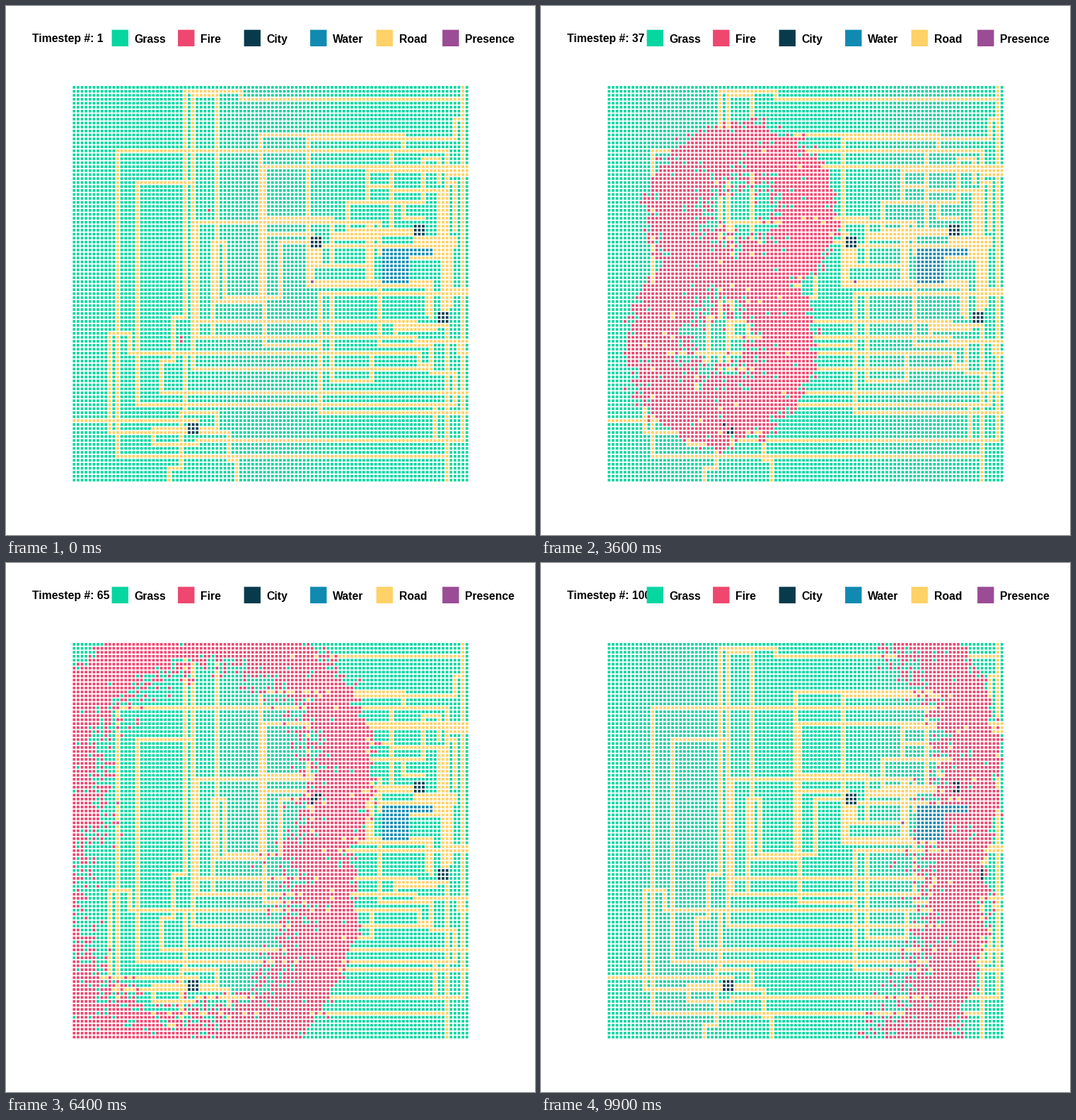
These frames come from a looping animation (748 px wide and 748 px high, 10 s). A matplotlib script:

```python
import numpy as np
import matplotlib.pyplot as plt
from matplotlib.animation import FuncAnimation
from matplotlib.patches import Rectangle

SIZE, N, STEPS = 748, 100, 100
SCALE = SIZE / 800          # layout is designed on an 800 px square
PITCH, CELL = 6, 4
LEGEND = [("Grass", "#06d6a0"), ("Fire", "#ef476f"), ("City", "#073b4c"),
          ("Water", "#118ab2"), ("Road", "#ffd166"), ("Presence", "#9a4c95")]
GRASS, FIRE, CITY, WATER, ROAD, PRESENCE = range(6)
RGB = np.array([[int(h[i:i + 2], 16) for i in (1, 3, 5)] for _, h in LEGEND])

land = np.full((N, N), GRASS)


def block(c0, r0, c1, r1, kind=ROAD):
    land[min(r0, r1):max(r0, r1) + 1, min(c0, c1):max(c0, c1) + 1] = kind


def road(c, r, *turns):
    """Lay a road from (c, r); turns alternate between a new column and a new row."""
    for i, v in enumerate(turns):
        nc, nr = (c, v) if i % 2 else (v, r)
        block(c, r, nc, nr)
        c, r = nc, nr


# West
road(94, 16, 11, 93, 94)
road(30, 24, 16, 80, 96, 72, 90, 65, 77, 50)
road(98, 3, 42, 1, 28, 58, 25, 69, 22, 77, 99)
road(28, 67, 28, 82)
road(30, 71, 30, 2, 36, 54)
road(48, 54, 35, 39, 38, 53, 52, 39, 60)
road(35, 54, 35, 62)
road(31, 34, 31, 63)
# South
road(87, 70, 87, 67, 14, 62, 9, 87, 39, 94, 41, 99)
road(0, 84, 31)
road(36, 86, 36, 82, 27, 96, 24, 99)
road(36, 86, 20, 90, 31, 89, 98, 0)
road(99, 82, 62, 52, 99)
road(65, 52, 65, 74, 75, 67)
road(30, 71, 90, 70, 87)
road(91, 80, 91, 89)
# Centre
road(47, 53, 47, 12, 83, 16)
road(99, 20, 48, 65, 62)
road(59, 50, 59, 13, 96, 8, 98)
road(30, 34, 77, 42)
road(47, 33, 65, 45)
road(48, 37, 60)
road(30, 59, 86, 60)
road(30, 63, 86, 64, 99)
block(59, 41, 62, 44)
road(74, 45, 60, 49, 90, 58)
road(59, 50, 90)
block(74, 34, 75, 50)
# East
road(99, 21, 74, 29)
road(74, 25, 80)
road(80, 16, 80, 36)
road(80, 26, 94)
road(85, 36, 69, 29, 88, 18, 92, 24)
road(83, 29, 83, 33, 88)
road(66, 37, 85)
road(65, 38, 77)
road(63, 40, 96)
block(86, 38, 96, 39)
block(92, 26, 94, 38)
block(91, 41, 95, 43)
road(94, 22, 99)
road(95, 24, 96, 36)
road(85, 43, 95, 55)
road(93, 36, 93, 56)
road(94, 51, 99)
road(89, 49, 89, 57)
road(81, 63, 81, 60, 94)
road(81, 61, 91)
road(97, 64, 97, 67, 99)
road(94, 16, 94, 99)

block(78, 41, 84, 49, WATER)
block(85, 41, 90, 42, WATER)
for c, r in [(60, 38), (86, 35), (92, 57), (29, 85)]:
    block(c, r, c + 2, r + 2, CITY)

rng = np.random.default_rng(7)
rows, cols = np.mgrid[:N, :N]


def spread(c, r, west, east, north, south):
    """Arrival time of a fire lit at (c, r), given its speed in each direction."""
    dx, dy = cols - c, rows - r
    return np.hypot(dx / np.where(dx < 0, west, east),
                    dy / np.where(dy < 0, north, south))


start = np.minimum(spread(34, 31, 0.69, 0.65, 0.61, 0.64),
                   spread(27, 63.5, 0.63, 0.69, 0.64, 0.74))
start += 0.8 * (np.sin(0.55 * cols + 0.3 * rows) + np.sin(0.5 * rows - 0.35 * cols))
start = np.maximum(start + rng.normal(0, 1.5, start.shape), 1)
spared = rng.random(start.shape) < np.where(land == CITY, 0.45, 0.03)
start[spared | (land == WATER)] = np.inf
start[[31, 63, 64], [34, 27, 27]] = 0
end = start + np.maximum(rng.normal(23, 4.5, start.shape), 8)

# Evacuees: step from which each cell (column, row) holds; None is out of sight
STOPS = [(0, (60, 49)), (16, (60, 48)), (36, (62, 49)), (40, (64, 49)),
         (56, None), (95, (74, 45))]


def coverage(origin):
    """Share of each pixel along one axis that each cell covers."""
    left = (origin + PITCH * np.arange(N)) * SCALE
    pixel = np.arange(SIZE)[:, None]
    overlap = np.minimum(pixel + 1, left + CELL * SCALE) - np.maximum(pixel, left)
    return np.clip(overlap, 0, 1)


COVER_X, COVER_Y = coverage(101), coverage(121)


def picture(t):
    now = land.copy()
    now[(start <= t) & (t < end)] = FIRE
    spot = [cell for since, cell in STOPS if since <= t][-1]
    if spot:
        now[spot[1], spot[0]] = PRESENCE
    ink = np.moveaxis(255.0 - RGB[now], 2, 0)
    shade = 255 - COVER_Y @ ink @ COVER_X.T
    return np.moveaxis(shade, 0, 2).round().astype(np.uint8)


fig = plt.figure(figsize=(SIZE / 100, SIZE / 100), dpi=100, facecolor="white")
ax = fig.add_axes([0, 0, 1, 1])
ax.axis("off")
image = ax.imshow(picture(0), extent=(0, SIZE, SIZE, 0), interpolation="nearest")
ax.set(xlim=(0, SIZE), ylim=(SIZE, 0))

FONT = dict(family="Liberation Sans", weight="bold", size=15.8 * 0.72, color="black")
counter = ax.text(40 * SCALE, 51, "", zorder=2, **FONT)
for i, (name, color) in enumerate(LEGEND):
    x, side = (160 + 100 * i) * SCALE, 25 * SCALE
    ax.add_patch(Rectangle((x, 36 * SCALE), side, side, fc=color, lw=0, zorder=3,
                           snap=False))
    ax.text(x + 32, 52, name, zorder=4, **FONT)


def draw(t):
    image.set_data(picture(t))
    counter.set_text(f"Timestep #: {t + 1}")
    return image, counter


anim = FuncAnimation(fig, draw, frames=STEPS, interval=100, repeat=True,
                     repeat_delay=0)
plt.show()
```
